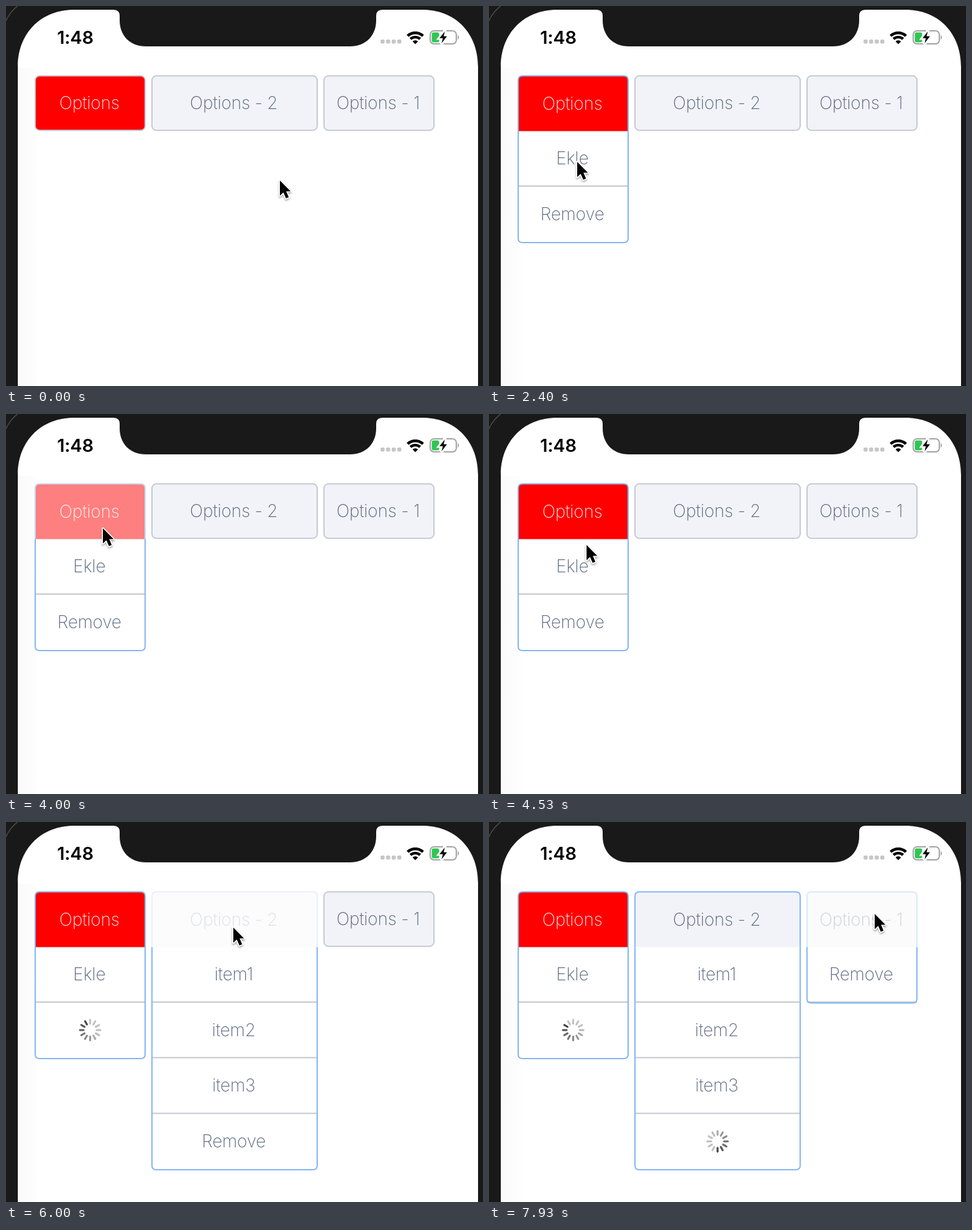
Write an HTML page that moves like this. It is 768 px wide and 612 px high and loops after 8 s.

```html
<!DOCTYPE html>
<html lang="en">
<head>
<meta charset="utf-8">
<title>Dropdown buttons</title>
<style>
  html, body { margin: 0; width: 100%; height: 100%; overflow: hidden; background: #191919; }
  svg { display: block; width: 768px; height: 612px; }
  text { font: 200 28px Inter, Roboto, sans-serif; letter-spacing: -.25px; text-anchor: middle; fill: #5a6880; }
  .clock { font-weight: 600; font-size: 29px; letter-spacing: -.2px; fill: #000; }
  .light { fill: #ffe2e2; }
  .line { fill: none; stroke-width: 2; }
</style>
</head>
<body>
<svg id="stage" viewBox="0 0 768 612">
  <defs>
    <linearGradient id="edge">
      <stop offset="0" stop-color="#fafafa"/>
      <stop offset="1" stop-color="#fefefe"/>
    </linearGradient>
    <filter id="shadow" x="-50%" y="-50%" width="200%" height="200%">
      <feDropShadow dx="0" dy="2" stdDeviation="1.6" flood-opacity=".38"/>
    </filter>
  </defs>
  <rect width="768" height="612" fill="#191919"/>
  <path d="M-2 28Q5 10 20 -1" fill="none" stroke="#4a4a4a" stroke-width="1.5"/>
  <path fill="#fff" d="M19 612V98C19 44 56 6 110 6H173Q183 6 183 16V23C183 48 200 65 225 65H554
    C579 65 596 48 596 23V16Q596 6 606 6H670C724 6 760 44 760 98V612Z"/>
  <rect x="19" y="100" width="32" height="512" fill="url(#edge)"/>

  <text class="clock" x="111.5" y="61">1:48</text>
  <g id="dots" fill="#c6c6c8"></g>
  <g fill="none" stroke="#000" stroke-width="4.4">
    <path d="M646.6 48.2a18 18 0 0 1 24.8 0"/>
    <path d="M651.3 53.2a11.2 11.2 0 0 1 15.4 0"/>
  </g>
  <path d="M659 61.5l-4.4-4.5a6.4 6.4 0 0 1 8.8 0z"/>
  <rect x="683" y="40" width="42" height="21" rx="6" fill="#fff" stroke="#a2a2a4" stroke-width="2"/>
  <path d="M727.2 46.5q4 4 0 8z" fill="#a2a2a4"/>
  <rect x="685.5" y="42.5" width="12" height="16" rx="3" fill="#30c552"/>
  <path d="M707 39.5L697.5 52H703L701 61.5L710.5 48.5H705Z" stroke="#fff" stroke-width="5" fill="#fff"/>
  <path d="M706.5 41L698 51.8H703.3L701.4 60L710 48.8H704.6Z"/>

  <g id="menus"></g>
  <path id="cursor" d="M0 0V24.5L5.6 19.3L9.8 28.8L14.2 26.9L10.2 17.5H17.3Z" fill="#000" stroke="#fff"
    stroke-width="3.2" paint-order="stroke" stroke-linejoin="round" filter="url(#shadow)"/>
</svg>
<script>
const LOOP = 8000, STEP = 1000 / 15;
const TOP = 112.6, FOLD = 201.4, ROW = 89.6;
const GREY = '#c3c9d3', BLUE = '#84b6f3';

// Each toggle is the release time of a click on the header.
const MENUS = [
  { x: 47, w: 177, label: 'Options', fill: '#fe0000', cls: 'light',
    items: ['Ekle', 'Remove'], end: 381, toggles: [1450, 3000, 3892], busy: 5040 },
  { x: 235, w: 266, label: 'Options - 2', fill: '#f2f3f8',
    items: ['item1', 'item2', 'item3', 'Remove'], end: 560, toggles: [6000], busy: 7410 },
  { x: 512, w: 177, label: 'Options - 1', fill: '#f2f3f8',
    items: ['Remove'], end: 291.5, toggles: [7870], busy: Infinity, lastRule: true }
];

// time, x, y of the pointer tip
const PATH = [
  [0, 441, 281], [900, 441, 281], [1330, 125, 168], [1800, 125, 168],
  [2300, 142, 251], [2500, 142, 251], [2850, 156, 184], [4400, 156, 184],
  [4850, 162, 338], [5520, 162, 338], [5880, 366, 170], [6100, 366, 170],
  [6640, 374, 420], [6700, 374, 420], [6900, 380, 482], [7440, 380, 482],
  [7780, 621, 148], [LOOP, 621, 148]
];

const byId = id => document.getElementById(id);

function add(parent, tag, attrs = {}, text = '') {
  const el = document.createElementNS('http://www.w3.org/2000/svg', tag);
  for (const key in attrs) el.setAttribute(key, attrs[key]);
  el.textContent = text;
  parent.append(el);
  return el;
}

const show = (el, on) => el.setAttribute('display', on ? 'inline' : 'none');
const ease = p => p < .5 ? 2 * p * p : 1 - 2 * (1 - p) ** 2;
const clamp = p => Math.max(0, Math.min(1, p));

for (let i = 0; i < 4; i++)
  add(byId('dots'), 'rect', { x: 603 + i * 9, y: 54, width: 6.6, height: 6.6, rx: 2 });

function makeSpinner(parent, x, y) {
  const g = add(parent, 'g', { transform: `translate(${x} ${y})`, stroke: '#000',
    'stroke-width': 3.2, 'stroke-linecap': 'round' });
  const spokes = [];
  for (let i = 0; i < 12; i++)
    spokes.push(add(g, 'path', { d: 'M0 -10.5V-16.5', transform: `rotate(${i * 30})` }));
  return { g, spokes };
}

function makeMenu(m) {
  const root = add(byId('menus'), 'g');
  const { x, w, end } = m, right = x + w, mid = x + w / 2, textX = mid - 1.3;

  m.list = add(root, 'g');
  m.items.forEach((name, i) => {
    const last = i === m.items.length - 1;
    const label = add(m.list, 'text', { x: textX, y: 255 + ROW * i }, name);
    if (!last || m.lastRule) {
      const y = 290 + ROW * i;
      add(m.list, 'path', { class: 'line', stroke: '#c5c7cf', d: `M${x} ${y}H${right}` });
    }
    if (last) {
      m.action = label;
      m.spinner = makeSpinner(m.list, mid, 245.5 + ROW * i);
    }
  });
  add(m.list, 'path', { class: 'line', stroke: BLUE,
    d: `M${x} ${FOLD}V${end - 7}q0 7 7 7H${right - 7}q7 0 7 -7V${FOLD}` });

  m.head = add(root, 'g');
  m.closed = add(m.head, 'rect', { x, y: TOP, width: w, height: 87.6, rx: 7,
    fill: m.fill, stroke: GREY, 'stroke-width': 2 });
  m.opened = add(m.head, 'path', { fill: m.fill, stroke: BLUE, 'stroke-width': 2,
    d: `M${x} ${FOLD}V${TOP + 7}q0 -7 7 -7H${right - 7}q7 0 7 7V${FOLD}` });
  m.title = add(m.head, 'text', { x: textX, class: m.cls || '' }, m.label);
}

// Touch feedback: quick dim on press, slower recovery after release.
function headOpacity(t, toggles) {
  let value = 1;
  for (const at of toggles) {
    const dt = t - at;
    if (dt >= -150 && dt < 0) value = 1 - .8 * ease(clamp((dt + 150) / 150));
    else if (dt >= 0 && dt < 250) value = .2 + .8 * ease(dt / 250);
  }
  return value;
}

function drawMenu(m, t) {
  const open = m.toggles.filter(at => at <= t).length % 2 === 1;
  const busy = t >= m.busy;
  show(m.list, open);
  show(m.opened, open);
  show(m.closed, !open);
  m.title.setAttribute('y', open ? 167 : 166);
  m.head.setAttribute('opacity', headOpacity(t, m.toggles));
  show(m.action, !busy);
  show(m.spinner.g, busy);
  if (!busy) return;
  const lead = Math.floor((t - m.busy) * 12 / 1000) % 12;
  m.spinner.spokes.forEach((spoke, i) => {
    const age = (lead - i + 12) % 12;
    spoke.setAttribute('opacity', Math.max(.24, .72 - .065 * age));
  });
}

function pointer(t) {
  const i = Math.max(1, PATH.findIndex(key => key[0] > t));
  const [t0, x0, y0] = PATH[i - 1], [t1, x1, y1] = PATH[i];
  const p = ease((t - t0) / (t1 - t0));
  return [x0 + (x1 - x0) * p, y0 + (y1 - y0) * p];
}

function draw(time) {
  const t = Math.floor((time % LOOP + 7) / STEP) % 120 * STEP;
  MENUS.forEach(m => drawMenu(m, t));
  byId('cursor').setAttribute('transform', `translate(${pointer(t)})`);
}

MENUS.forEach(makeMenu);
const start = performance.now();
function tick() {
  draw(performance.now() - start);
  requestAnimationFrame(tick);
}
tick();
</script>
</body>
</html>
```
